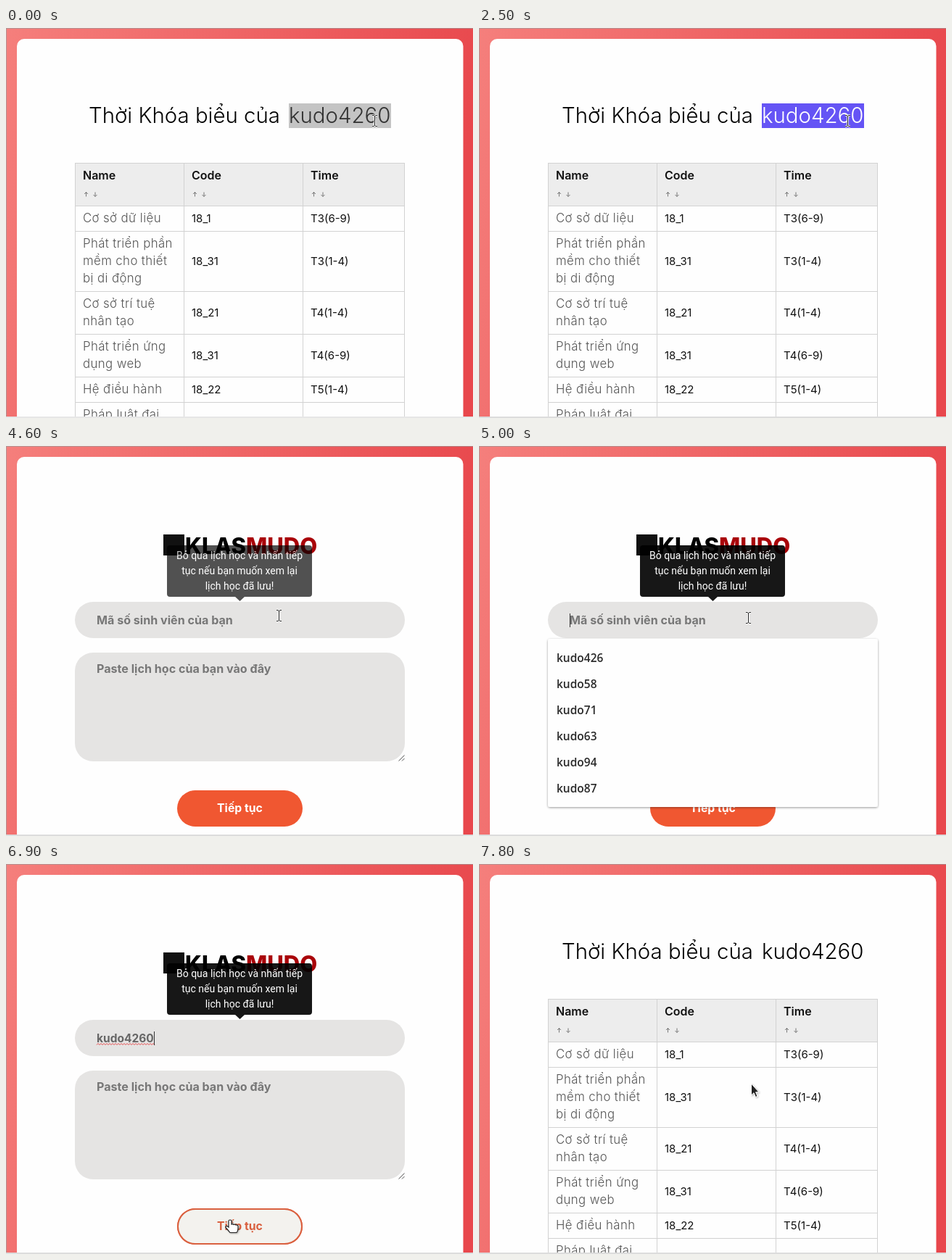
An HTML page that plays this animation: 644 px wide and 538 px high, repeating every 8 s.

```html
<!DOCTYPE html>
<html lang="vi">
<head>
<meta charset="utf-8">
<title>Thời khóa biểu</title>
<style>
  html, body { margin: 0; width: 100%; height: 100%; overflow: hidden; background: #fefefe; }
  svg { display: block; width: 644px; height: 538px; font-family: Inter, "Open Sans", sans-serif; }
  text { white-space: pre; }
  .title { font-size: 29.4px; font-weight: 350; }
  .head { font-size: 16px; font-weight: 600; fill: #111; }
  .name { font-size: 16.8px; letter-spacing: .4px; fill: #555; font-weight: 350; }
  .cell { font-size: 15px; fill: #111; }
  .field { font-size: 16.1px; font-weight: 650; fill: #777; }
  #typed { font-size: 15.5px; fill: #666; }
  .logo { font-size: 31px; font-weight: 800; }
  .tip { font: 14px Roboto, sans-serif; fill: #fff; text-anchor: middle; }
  .option { font: 600 15.5px "Open Sans", "Noto Sans", sans-serif; fill: #2a2a2a; }
  .button { font-size: 15.8px; font-weight: 700; text-anchor: middle; }
</style>
</head>
<body>
<svg viewBox="0 0 644 538">
  <defs>
    <linearGradient id="red" x1="0" y1="0" x2="1" y2=".25">
      <stop offset="0" stop-color="#f57f7c"/>
      <stop offset="1" stop-color="#e8474c"/>
    </linearGradient>
    <filter id="shade" x="-5%" y="-5%" width="110%" height="112%">
      <feDropShadow dx="0" dy="1" stdDeviation="1.5" flood-opacity=".4"/>
    </filter>
    <filter id="soft" x="-50%" y="-50%" width="200%" height="200%">
      <feDropShadow dx="1" dy="1" stdDeviation="1" flood-opacity=".3"/>
    </filter>
  </defs>

  <rect width="644" height="538" fill="url(#red)"/>
  <rect x="15" y="15" width="615.5" height="560" rx="10" fill="#fefefe"/>

  <g id="tablePage">
    <rect id="selection" x="390" y="104" width="141" height="34"/>
    <text class="title" x="114" y="131">Thời Khóa biểu của</text>
    <text class="title" id="user" x="390" y="131">kudo4260</text>
    <rect x="95" y="186" width="455" height="59" fill="#ededed"/>
    <g id="grid"></g>
  </g>

  <g id="formPage">
    <rect x="217" y="122" width="29" height="29" fill="#111"/>
    <text class="logo" x="247" y="149">KLAS<tspan fill="#a90409">MUDO</tspan></text>
    <rect x="95" y="215" width="455" height="50" rx="25" fill="#e5e4e3"/>
    <text class="field" id="hint" x="125" y="246">Mã số sinh viên của bạn</text>
    <text class="field" id="typed" x="125" y="246">kudo4260</text>
    <path id="squiggle" fill="none" stroke="#e5484a"/>
    <rect id="caret" y="231" width="1" height="19" fill="#333"/>
    <rect x="95" y="285" width="455" height="150" rx="25" fill="#e5e4e3"/>
    <text class="field" x="125" y="313">Paste lịch học của bạn vào đây</text>
    <path d="M541.5 434.5l8-8M546 434.5l3.5-3.5" stroke="#555"/>
    <rect x="236" y="475" width="173" height="50" rx="25" fill="#f05731"/>
    <text class="button" x="322.5" y="505" fill="#fff">Tiếp tục</text>
    <g id="hover">
      <rect x="237" y="476" width="171" height="48" rx="24" fill="#f3f2ee" stroke="#d9603f" stroke-width="2"/>
      <text class="button" x="322.5" y="505" fill="#d9603f">Tiếp tục</text>
    </g>
    <g id="list">
      <rect x="95" y="266" width="455" height="232" rx="3" fill="#fefefe" filter="url(#shade)"/>
    </g>
    <g id="tooltip">
      <path d="M226 137H418a4 4 0 0 1 4 4V204a4 4 0 0 1-4 4H329l-6.5 6-6.5-6H226a4 4 0 0 1-4-4V141a4 4 0 0 1 4-4Z" fill="#000" opacity=".91"/>
      <text class="tip" x="322" y="156">Bỏ qua lịch học và nhấn tiếp</text>
      <text class="tip" x="322" y="177">tục nếu bạn muốn xem lại</text>
      <text class="tip" x="322" y="198">lịch học đã lưu!</text>
    </g>
  </g>

  <path d="M0 .5H644M.5 0V538" stroke="#a09a9a" stroke-opacity=".75"/>
  <rect id="edge" y="536" width="644" height="2"/>

  <g id="cursor">
    <g id="beam" fill="none">
      <path d="M-3-7.5H-1L.5-6.5 2-7.5H4M.5-6.5V6.5M-3 7.5H-1L.5 6.5 2 7.5H4" stroke="#fff" stroke-width="2.6"/>
      <path d="M-3-7.5H-1L.5-6.5 2-7.5H4M.5-6.5V6.5M-3 7.5H-1L.5 6.5 2 7.5H4" stroke="#222"/>
    </g>
    <path id="arrow" d="M.5 0V16L4 12.7 6.5 18.5 9 17.4 6.6 11.8H11Z" fill="#222" stroke="#fff" filter="url(#soft)"/>
    <path id="hand" d="M-2 10V1.5Q-2 0 0 0T2 1.5V6Q4 5 5 6.5 7 5.5 8 7 11 6.5 11 9V12Q11 15 9 17.5H0Q-2 15-6 10.5-6.5 8-4 8.5Z" fill="#fff" stroke="#222" stroke-width="1.2" filter="url(#soft)"/>
  </g>
</svg>
<script>
const LOOP = 8000;
const el = id => document.getElementById(id);

function add(parent, tag, attrs, text = "") {
  const node = document.createElementNS("http://www.w3.org/2000/svg", tag);
  for (const key in attrs) node.setAttribute(key, attrs[key]);
  node.textContent = text;
  el(parent).append(node);
}
const label = (parent, cls, x, y, text) => add(parent, "text", { class: cls, x, y }, text);

// Table: each row has its top edge, name lines, code and time.
const rows = [
  [245, "Cơ sở dữ liệu", "18_1", "T3(6-9)"],
  [280, "Phát triển phần|mềm cho thiết|bị di động", "18_31", "T3(1-4)"],
  [363, "Cơ sở trí tuệ|nhân tạo", "18_21", "T4(1-4)"],
  [422, "Phát triển ứng|dụng web", "18_31", "T4(6-9)"],
  [481, "Hệ điều hành", "18_22", "T5(1-4)"],
  [516, "Pháp luật đại", "", ""]
];
const columns = [95, 245, 409];
const lines = [186, ...rows.map(r => r[0])].map(y => `M95 ${y + .5}H550`).join("")
  + [...columns, 549].map(x => `M${x + .5} 186V536`).join("");
add("grid", "path", { d: lines, stroke: "#d2d2d2" });

["Name", "Code", "Time"].forEach((text, i) => {
  const x = columns[i] + 11;
  label("grid", "head", x, 209, text);
  add("grid", "path", {
    d: `M${x + 4.5} 232.5v-6m-2.5 2.5l2.5-2.5 2.5 2.5M${x + 17} 226.5v6m-2.5-2.5l2.5 2.5 2.5-2.5`,
    fill: "none", stroke: "#777"
  });
});

for (const [top, name, code, time] of rows) {
  const parts = name.split("|");
  parts.forEach((part, i) => label("grid", "name", 106, top + 23 + 24 * i, part));
  const y = top + 11 + 12 * parts.length;
  label("grid", "cell", 256, y, code);
  label("grid", "cell", 420, y, time);
}

["426", "58", "71", "63", "94", "87"].forEach((n, i) =>
  label("list", "option", 107, 297.5 + 36 * i, "kudo" + n));
el("squiggle").setAttribute("d", "M125 249.5" + "l2-2 2 2".repeat(20));

// Held steps: [time, value...]
const pointer = [
  [0, 508, 128, "beam"], [3800, 508, 127, "arrow"],
  [4300, 500, 134, "arrow"], [4400, 455, 175, "arrow"], [4500, 398, 222, "beam"],
  [4600, 376, 234, "beam"], [4700, 371, 237, "beam"],
  [6300, 367, 380, "beam"], [6500, 356, 425, "beam"], [6600, 336, 460, "arrow"],
  [6700, 318, 484, "hand"], [6800, 312, 489, "hand"], [6900, 309, 491, "hand"],
  [7400, 309, 491, "arrow"], [7500, 318, 460, "arrow"], [7600, 345, 385, "arrow"],
  [7700, 368, 322, "arrow"], [7800, 375, 303, "arrow"]
];
const fades = {
  tablePage: [[0, 1], [4000, 0], [7400, 1]],
  formPage: [[0, 0], [4000, 1], [7400, 0]],
  tooltip: [[0, 0], [4500, .35], [4600, .75], [4700, 1], [7100, .4], [7200, 0]],
  list: [[0, 0], [5000, 1], [5600, .6], [5700, .25], [5800, 0]],
  hint: [[0, 1], [5600, 0]],
  typed: [[0, 0], [5600, 1]],
  squiggle: [[0, 0], [5600, 1], [7100, 0]],
  caret: [[0, 0], [5000, 1], [6200, 0], [6800, 1], [7100, 0]],
  hover: [[0, 0], [6700, .35], [6800, .75], [6900, 1]]
};
const selections = [
  [0, "#c4c4c4", "#333"], [2500, "#6554f5", "#fff"], [7400, "none", "#000"]
];
const at = (steps, t) => steps.findLast(step => step[0] <= t).slice(1);

function draw(t) {
  for (const id in fades) {
    const [opacity] = at(fades[id], t);
    el(id).style.opacity = opacity;
  }
  const [back, ink] = at(selections, t);
  el("selection").setAttribute("fill", back);
  el("user").setAttribute("fill", ink);
  el("edge").setAttribute("fill", t < 1400 ? "#e6e6e6" : "#dcdcdc");
  el("caret").setAttribute("x", t < 5600 ? 125 : 204);

  const [x, y, shape] = at(pointer, t);
  el("cursor").setAttribute("transform", `translate(${x} ${y})`);
  for (const id of ["beam", "arrow", "hand"])
    el(id).style.display = id === shape ? "" : "none";
}

const start = performance.now();
function tick() {
  draw((performance.now() - start) % LOOP);
  requestAnimationFrame(tick);
}
tick();
</script>
</body>
</html>
```
